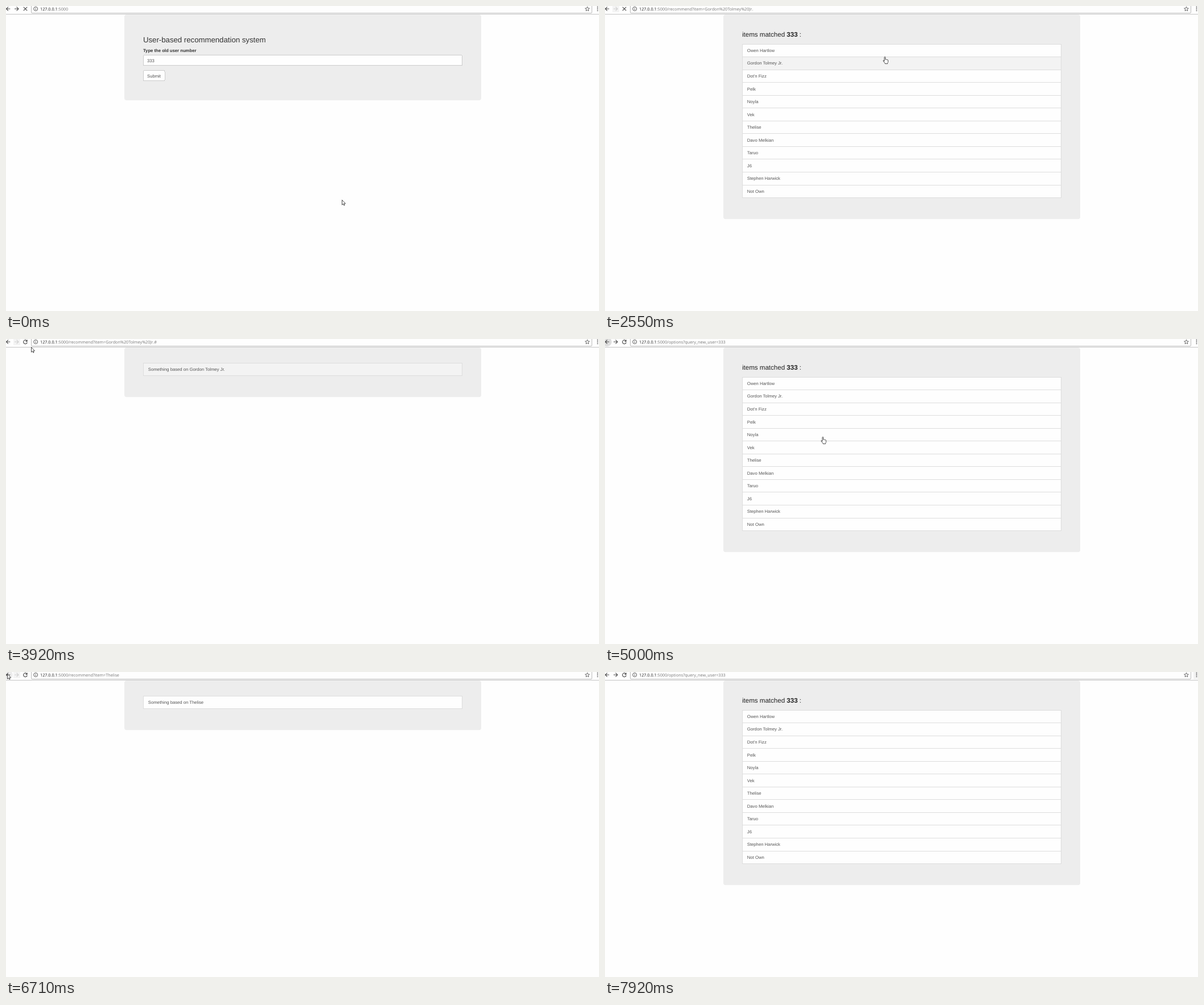
An HTML page for the animation above (8000 ms loop, 1042 by 537 pixels).

```html
<!DOCTYPE html>
<html lang="en">
<head>
<meta charset="utf-8">
<title>User-based recommendation system</title>
<style>
  html, body { margin: 0; height: 100%; overflow: hidden; background: #fefefe; }
  svg { display: block; width: 100vw; height: 100vh; }
  text { font: 7.7px "Liberation Sans", Arial, sans-serif; fill: #555; text-rendering: geometricPrecision; white-space: pre; }
  .title { font-size: 13.2px; fill: #333; }
  .lead { font-size: 11.55px; fill: #222; }
  .label { font-weight: bold; fill: #333; }
  .url { font: 7.24px "Open Sans", "Noto Sans", sans-serif; fill: #777; }
  .host { fill: #222; }
  .panel { fill: #ededed; }
  .box { fill: #fefefe; stroke: #ddd; shape-rendering: crispEdges; }
  .field { stroke: #ccc; }
  .over { fill: #f3f3f3; }
  .icon { fill: none; stroke: #4a4a4a; stroke-width: 1.15; }
  .off { stroke: #d0d0d0; }
  .cursor { fill: #fff; stroke: #222; stroke-width: .8; stroke-linejoin: round; }
  .hidden { display: none; }
</style>
</head>
<body>
<svg viewBox="0 0 1042 537">
  <defs>
    <path id="arrowShape" d="M.5 .5V9.2L2.5 7.4L3.9 10.2L5.1 9.6L3.8 6.9H6.5Z"/>
    <path id="handShape" d="M2.9 8.2V1.4a.9 .9 0 0 1 1.8 0V5.2q.9-.7 1.6 .2q.9-.6 1.5 .3q1.6-.4 1.6 1V9.3q0 1.2-.9 2.3V12.6H4.1V11.8L.8 7.7q0-1.3 1.2-.8Z"/>
  </defs>

  <g id="pages">
    <g id="form">
      <rect class="panel" x="208" y="15.3" width="627" height="150.7" rx="4"/>
      <text class="title" x="241" y="64.3">User-based recommendation system</text>
      <text class="label" x="241" y="80.8">Type the old user number</text>
      <rect class="box field" x="241.3" y="86.6" width="560.4" height="18.2" rx="2"/>
      <text x="248" y="98.5">333</text>
      <rect class="box field" x="241.3" y="113.6" width="37.7" height="18.2" rx="2"/>
      <text x="248" y="125.5" fill="#333">Submit</text>
    </g>
    <g id="list">
      <rect class="panel" x="208" y="15.3" width="627" height="360" rx="4"/>
      <text class="lead" x="241" y="54">items matched <tspan font-weight="bold">333</tspan> :</text>
    </g>
    <g id="result">
      <rect class="panel" x="208" y="15.3" width="627" height="87" rx="4"/>
      <rect id="resultBox" class="box" x="241.3" y="42.2" width="560.4" height="22.6" rx="2"/>
      <text id="resultText" x="249.8" y="56.3"></text>
    </g>
  </g>

  <path d="M0 14.5H1042" stroke="#c4c4c4"/>
  <path d="M44.5 0V11q0 1.5 1.5 1.5H1028q1.5 0 1.5-1.5V0" fill="none" stroke="#bcbcbc"/>
  <circle id="backGlow" cx="3.5" cy="5" r="8.3"/>
  <path class="icon" d="M7.3 5H.5M3.9 1.6L.5 5L3.9 8.4"/>
  <rect id="forwardPlate" x="13" y="0" width="12" height="11" fill="#f4f4f4"/>
  <path id="forward" class="icon" d="M15 5H22M18.6 1.6L22 5L18.6 8.4"/>
  <path id="stop" class="icon" d="M30.8 1.8L37.2 8.2M37.2 1.8L30.8 8.2"/>
  <g id="reload">
    <path class="icon" d="M36.5 3.1A3.3 3.3 0 1 0 37.2 6"/>
    <path d="M37.7 1V4.7H34Z" fill="#4a4a4a"/>
  </g>
  <circle class="icon" cx="52.2" cy="5" r="3.5" style="stroke-width:.9"/>
  <path class="icon" d="M52.2 4.5V7M52.2 2.8V3.7" style="stroke-width:.9"/>
  <text class="url" x="60" y="7.7"><tspan class="host">127.0.0.1</tspan>:5000<tspan id="path"></tspan></text>
  <path class="icon" style="stroke-width:.8" d="M1021.5 1.2L1022.6 3.9L1025.4 4.1L1023.2 5.9L1023.9 8.7L1021.5 7.2L1019.1 8.7L1019.8 5.9L1017.6 4.1L1020.4 3.9Z"/>
  <rect id="menuGlow" x="1034" y="0" width="8" height="13" fill="#f2f2f2"/>
  <path d="M1039.5 1.1v1.6M1039.5 4.3v1.6M1039.5 7.5v1.6" stroke="#4a4a4a" stroke-width="1.6"/>
  <use id="cursor" class="cursor"/>
</svg>

<script>
const LOOP = 8000, ROW = 22.55;
const names = ["Owen Hartlow", "Gordon Tolmey Jr.", "Dot'n Fizz", "Pelk", "Noyla", "Vek",
  "Thelise", "Davo Melkian", "Taruo", "J6", "Stephen Harwick", "Not Own"];
const $ = id => document.getElementById(id);
const show = (id, on) => $(id).classList.toggle("hidden", !on);

function add(parent, tag, attrs, text = "") {
  const el = document.createElementNS("http://www.w3.org/2000/svg", tag);
  for (const key in attrs) el.setAttribute(key, attrs[key]);
  el.textContent = text;
  parent.append(el);
  return el;
}

const rows = names.map((name, i) => {
  const y = 67 + i * ROW;
  const box = add($("list"), "rect", { class: "box", x: 241.3, y, width: 560.4, height: ROW, rx: i % 11 ? 0 : 2 });
  add($("list"), "text", { x: 249.8, y: y + 13.9 }, name);
  return box;
});

const options = "/options?query_new_user=333";
const recommend = i => "/recommend?item=" + encodeURI(names[i]);

// Each step changes only the listed parts of the view.
const views = [
  [0, { page: "form", path: "", loading: true, forward: true, hover: -1, pick: 1, active: false, glow: "none", menu: false }],
  [500, { page: "list", path: options, forward: false }],
  [620, { loading: false }],
  [2550, { path: recommend(1), loading: true, hover: 1 }],
  [2670, { page: "result", loading: false }],
  [3360, { path: recommend(1) + "#", active: true }],
  [4190, { glow: "#ececec" }],
  [4460, { glow: "#dedede" }],
  [4580, { path: options, forward: true, loading: true }],
  [5000, { page: "list", loading: false, hover: -1 }],
  [5150, { glow: "none" }],
  [5420, { path: recommend(6), forward: false, loading: true, hover: 6 }],
  [5540, { page: "result", pick: 6, active: false }],
  [5670, { loading: false }],
  [6320, { glow: "#ececec" }],
  [6860, { glow: "#dedede" }],
  [6980, { path: options, forward: true }],
  [7100, { page: "list", hover: -1, glow: "none" }],
  [7400, { menu: true }]
];

// time, shape, x, y
const moves = [
  [0, "arrow", 590, 341], [1740, "hand", 304, 140], [1860, "arrow", 520, 32],
  [2020, "hand", 489, 81], [2160, "hand", 488, 89], [2670, "arrow", 427, 147],
  [2820, "arrow", 416, 163], [2970, "arrow", 340, 118], [3100, "arrow", 276, 77],
  [3240, "hand", 334, 52], [3640, "hand", 348, 60], [3770, "arrow", 174, 43],
  [3920, "arrow", 44, 14], [4060, "arrow", 14, 8], [4190, "arrow", 2, 3],
  [5000, "hand", 379, 172], [5150, "hand", 383, 192], [5270, "hand", 382, 205],
  [5540, "arrow", 368, 205], [5810, "arrow", 280, 152], [5930, "arrow", 150, 84],
  [6050, "arrow", 50, 30], [6180, "arrow", 7, 8], [6320, "arrow", 2, 2],
  [6560, "arrow", 0, 2], [6710, "arrow", 2, 3], [7100, "", 0, 0],
  [7400, "arrow", 1035, 7], [7520, "arrow", 1037, 250], [7640, "arrow", 1035, 522],
  [7790, "arrow", 1023, 525], [7920, "", 0, 0]
];

const last = (steps, t) => steps.findLastIndex(step => step[0] <= t);

function drawView(n) {
  const v = Object.assign({}, ...views.slice(0, n + 1).map(step => step[1]));
  for (const page of ["form", "list", "result"]) show(page, v.page === page);
  rows.forEach((box, i) => box.classList.toggle("over", i === v.hover));
  $("resultText").textContent = "Something based on " + names[v.pick];
  $("resultBox").classList.toggle("over", v.active);
  $("path").textContent = v.path;
  $("forward").classList.toggle("off", !v.forward);
  show("forwardPlate", !v.forward);
  show("stop", v.loading);
  show("reload", !v.loading);
  $("backGlow").setAttribute("fill", v.glow);
  show("menuGlow", v.menu);
}

function drawCursor(n) {
  const [, shape, x, y] = moves[n];
  show("cursor", shape);
  if (!shape) return;
  $("cursor").setAttribute("href", `#${shape}Shape`);
  $("cursor").setAttribute("transform", `translate(${x} ${y})`);
}

let view = -1, move = -1;
function tick() {
  const t = performance.now() % LOOP;
  const v = last(views, t), m = last(moves, t);
  if (v !== view) drawView(view = v);
  if (m !== move) drawCursor(move = m);
  requestAnimationFrame(tick);
}
tick();
</script>
</body>
</html>
```
